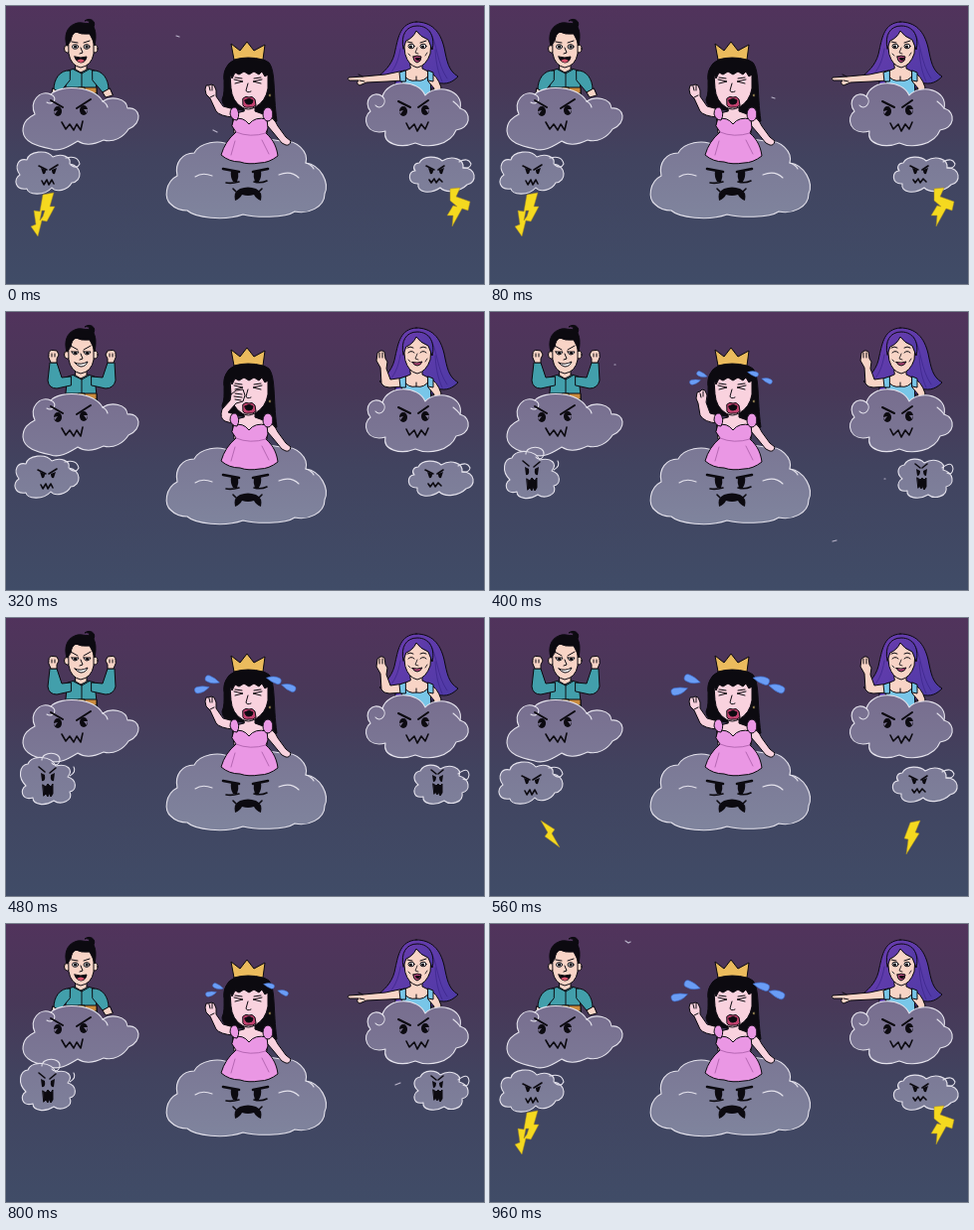
An HTML page for the animation above (1.04 s loop, 480x280 px).

```html
<!DOCTYPE html>
<html lang="en">
<head>
<meta charset="utf-8">
<title>Storm clouds</title>
<style>
html, body { margin: 0; width: 100%; height: 100%; overflow: hidden; background: #43405e; }
svg { display: block; width: 100%; height: 100%; }
.ink { stroke: #0c0a10; stroke-width: 1; stroke-linejoin: round; stroke-linecap: round; }
.line { fill: none; }
.skin { fill: #f8d4c6; }
.rosy { fill: #f9d2de; }
.teal { fill: #429fab; }
.blue { fill: #78c6e8; }
.pink { fill: #ea97e4; }
.black { fill: #0c0a10; }
.cloud { fill: url(#mist); stroke: #e4e2ec; stroke-width: 1.1; stroke-linejoin: round; stroke-linecap: round; }
.curl { fill: none; }
.face { fill: none; stroke: #0c0a10; stroke-width: 1.6; stroke-linejoin: round; stroke-linecap: round; }
.bolt { fill: #f5d91f; stroke: #a98c22; stroke-width: .5; }
.tear { fill: #6a9df5; stroke: #3f6fd0; stroke-width: .5; }
.speck { fill: none; stroke: #b9b3c9; stroke-width: 1.2; stroke-linecap: round; }
</style>
</head>
<body>
<svg viewBox="0 0 480 280" preserveAspectRatio="none">
<defs>
  <linearGradient id="sky" x2="0" y2="1">
    <stop offset="0" stop-color="#51335c"/>
    <stop offset=".28" stop-color="#483858"/>
    <stop offset=".55" stop-color="#41435f"/>
    <stop offset="1" stop-color="#404c67"/>
  </linearGradient>
  <linearGradient id="mist" gradientUnits="userSpaceOnUse" x1="0" y1="80" x2="0" y2="214">
    <stop offset="0" stop-color="#786e8f"/>
    <stop offset="1" stop-color="#7f849d"/>
  </linearGradient>
  <linearGradient id="hair" x2="1" y2="1">
    <stop offset="0" stop-color="#6c3cae"/>
    <stop offset="1" stop-color="#4c3aa6"/>
  </linearGradient>
</defs>
<rect width="480" height="280" fill="url(#sky)"/>
<g id="specks"></g>

<!-- prince -->
<g class="ink">
  <path class="teal" d="M62 65Q75 60 89 65L92 94H59Z"/>
  <path class="line" d="M76 65V83M68 64l8 4 7-4"/>
  <path fill="#c98a3c" d="M61 82H91V88H61Z"/>
  <rect x="73" y="82" width="6" height="6" fill="#e9bd58"/>
  <g data-pose="laugh">
    <path class="teal" d="M64 65C54 64 48 74 48 84L54 87 64 75Z"/>
    <path class="teal" d="M87 65C97 64 103 74 103 84L97 87 87 75Z"/>
    <path class="skin" d="M47 83l7 4-1 5-7-1zM104 83l-7 4 3 5 7-2z"/>
  </g>
  <g data-pose="smug">
    <path class="teal" d="M65 65L56 66 51 51 44 51 42 69Q43 77 51 77L65 74Z"/>
    <path class="teal" d="M86 65L97 66 102 51 109 51 110 69Q108 77 100 77L86 74Z"/>
    <path class="skin" d="M43 42Q43 38 47 38.500L51 39 53 43 51 47 51 51H45L43 46Z"/>
    <path class="skin" d="M110 42Q110 38 106 38.500L102 39 100 43 102 47 102 51H108L110 46Z"/>
    <path class="line" d="M46 42v3M49 42v3M104 42v3M107 42v3"/>
  </g>
  <path class="skin" d="M70 57H81V64L75 67 70 64Z"/>
  <ellipse class="skin" cx="61.500" cy="43" rx="3" ry="4"/>
  <ellipse class="skin" cx="89" cy="43" rx="3" ry="4"/>
  <path class="skin" d="M63 30Q75 21 88 30L88 48Q86 60 75 62 65 60 63 48Z"/>
  <path class="black" d="M61 40C58 30 61 21 69 18 75 15 80 19 84 17 84 15 81 14 79 15 84 11 91 15 88 21 91 27 90 34 89 40L87 34 84 28Q75 29 70 26 66 28 65 35Z"/>
  <path class="line" d="M75 42l2 5-3 1"/>
  <g data-pose="laugh">
    <path class="line" d="M66 36l6 1M78 37l6-2"/>
    <ellipse cx="69.500" cy="41" rx="3" ry="2.300" fill="#fff"/>
    <ellipse cx="81" cy="41" rx="3" ry="2.300" fill="#fff"/>
    <path class="black" d="M69 40h1.500v2H69zM80.500 40H82v2h-1.500z"/>
    <path class="black" d="M69 51Q75 53 81 51 80 57 75 57 70 56 69 51Z"/>
    <path fill="#d9546c" stroke="none" d="M71 55Q75 52 79 55 77 57 75 57 72 56 71 55Z"/>
  </g>
  <g data-pose="smug">
    <path class="line" d="M65 34l7 4M78 38l7-4"/>
    <path fill="#fff" d="M66 40H73Q72 43 69 43 67 43 66 40ZM78 40H85Q84 43 81 43 79 43 78 40Z"/>
    <path class="black" d="M69 40.500h1.500v1.500H69zM81 40.500h1.500v1.500H81z"/>
    <path fill="#fff" d="M69 51Q75 54 82 50 80 55 75 55 71 54 69 51Z"/>
  </g>
</g>

<!-- lady -->
<g class="ink">
  <path fill="url(#hair)" d="M412 16C396 17 394 31 391 44 389 57 382 64 375 70 382 73 388 73 392 71L390 82 430 83 433 77C443 80 449 76 454 71 444 65 443 56 440 42 436 25 427 16 412 16Z"/>
  <path fill="none" stroke="#3a2488" stroke-width=".7" d="M425 24C434 39 432 57 443 73M396 43C394 56 390 64 384 70M431 44C432 59 434 67 438 76"/>
  <path class="skin" d="M406 57H418V63L428 68 426 82H398L397 67 406 63Z"/>
  <path class="blue" d="M398 68Q404 77 412 75 420 77 426 68L427 92H398Z"/>
  <path class="line" d="M412 71v4"/>
  <g data-pose="laugh">
    <path class="skin" d="M400 65L381 69 359 71 344 72Q342 74 345 75L354 75Q351 78 355 80L362 77 383 76 400 75Z"/>
    <path class="line" d="M355 75l5 1M358 71l-4-2"/>
  </g>
  <g data-pose="smug">
    <path class="skin" d="M400 66L386 68 382 57 383 50 381 47 380 40 378 39 376 39 373 41 372 49 376 56 377 72Q379 76 385 76L400 75Z"/>
    <path class="line" d="M375 41v5M378 41v5"/>
  </g>
  <path class="blue" d="M401 65L395 67 396 76 401 76Z"/>
  <path class="skin" d="M424 66Q433 69 437 82L434 90 427 91 430 83 424 76Z"/>
  <path class="blue" d="M424 65L429 67 429 76 424 75Z"/>
  <path class="skin" d="M399 33Q403 24 413 25 424 25 427 34L426 48Q422 60 413 62 404 60 401 49Z"/>
  <path fill="url(#hair)" d="M399 43C396 29 402 20 413 20 426 20 431 32 428 44L424 34Q416 31 412 25 409 32 402 35Z"/>
  <path class="line" stroke-width=".8" d="M413 42l-2 5 3 1M404 48l2 2M423 47l-2 3"/>
  <g data-pose="laugh">
    <path class="line" d="M403 36l5 1M416 37l6-2"/>
    <ellipse cx="407" cy="40.500" rx="3" ry="2.300" fill="#fff"/>
    <ellipse cx="419" cy="40.500" rx="3" ry="2.300" fill="#fff"/>
    <path class="black" d="M406 40h1.500v1.500H406zM418 40h1.500v1.500H418z"/>
    <path fill="#b8477c" d="M409 51Q413 49 417 51 417 56 413 57 409 56 409 51Z"/>
    <path class="black" stroke="none" d="M411 52h5q0 3-2.500 3t-2.500-3z"/>
  </g>
  <g data-pose="smug">
    <path class="line" d="M403 36q3-2 6 0M416 36q3-2 6 0M404 41q3-3 6 0M416 41q3-3 6 0"/>
    <path fill="#b8477c" d="M408 50.500Q413 52 418 50 416 54 413 54 410 54 408 50.500Z"/>
  </g>
</g>

<!-- large clouds -->
<g class="cloud">
  <path d="M45 89C54 79 88 80 97 96C106 90 121 93 122 103C135 101 138 118 123 124C118 132 108 138 98 135C86 141 78 140 72 136C62 142 54 147 45 144C32 141 18 138 17 126C17 116 23 112 29 109C23 96 34 84 45 89Z"/>
  <path class="curl" d="M45 89C53 92 47 101 41 97M97 96Q101 98 102 102"/>
  <path d="M378 91C384 73 414 74 421 90C432 78 460 84 456 103C469 107 466 124 452 125C446 140 424 144 411 138C396 144 378 139 381 126C361 131 357 112 366 106C358 96 368 84 378 91Z"/>
  <path class="curl" d="M378 91C384 97 376 106 371 100M449 96Q453 99 456 103"/>
</g>
<g class="face">
  <path stroke-width="2" d="M45 95L57 102M71 103L85 94M394 96L406 102M414 102L424 95"/>
  <path d="M56 117l4 7 4-5 4 6 3-6 4 6 2-9M402 118l3 6 5-5 3 7 4-7 4 5 3-7"/>
  <g class="black" stroke="none">
    <ellipse cx="52" cy="106" rx="4" ry="5"/><ellipse cx="78" cy="105" rx="4" ry="5"/>
    <ellipse cx="399" cy="106" rx="4" ry="5"/><ellipse cx="421" cy="105" rx="4" ry="5"/>
  </g>
</g>
<path fill="#79718f" d="M48 106l4-1-3 4zM82 104l-4 0 3 4zM395 106l4-1-3 4zM425 104l-4 0 3 4z"/>

<!-- middle cloud -->
<g class="cloud">
  <path d="M166 200C158 194 160 177 172 171C169 158 177 148 189 148C194 138 214 133 226 141C240 133 266 134 276 136C292 134 304 147 301 158C316 160 325 178 320 189C320 203 303 210 290 207C280 214 250 213 238 210C218 217 190 213 182 206Q172 206 166 200Z"/>
  <path class="curl" d="M190 172Q197 167 207 171M274 170Q286 165 294 173M301 158Q307 160 309 164"/>
</g>
<g class="face">
  <path stroke-width="2.600" d="M218 164L234 167M248 167L263 164"/>
  <path stroke-width="1.600" d="M221 178Q227 179 234 177M249 177Q256 179 262 176M228 184L231 187M257 184L254 187"/>
</g>
<path class="black" d="M226 166H233Q234 172 232 177H228Q225 172 226 166ZM249 166H256Q257 172 254 177H250Q248 172 249 166Z"/>
<path class="black" d="M230 196Q228 187 235 184 243 181 251 184 258 187 256 196 251 194 249 190 243 192 237 190 235 194 230 196Z"/>

<!-- princess -->
<g class="ink">
  <path class="black" d="M224 58C232 50 255 50 264 57 271 66 268 87 272 116 268 119 263 114 260 110L228 103C222 104 217 100 217 94 222 84 215 69 224 58Z"/>
  <path class="rosy" d="M239 99H250V106L264 111 262 128H229L227 109 239 106Z"/>
  <path class="rosy" d="M263 111Q269 112 273 121L281 132 286 136Q285 141 281 140L277 138 268 127 262 120Z"/>
  <path class="pink" d="M229 114Q238 111 244 119 250 111 262 114L263 123 261 128C269 135 272 143 273 151Q264 158 255 158 243 160 235 157 224 157 216 150 220 136 231 127L227 121Z"/>
  <path class="line" stroke="#a85ba6" stroke-width=".8" d="M231 127Q245 133 261 128M230 136L226 150M257 135L264 149"/>
  <ellipse class="pink" cx="263" cy="109" rx="5" ry="7"/>
  <path class="rosy" d="M225 67Q227 58 244 58 261 58 263 67L263 83Q261 96 250 102 243 106 237 102 227 96 226 83Z"/>
  <path class="black" d="M219 74C217 60 229 51 243 52 259 50 268 62 267 77L263 69 260 71 257 66 254 69 249 66 244 69 239 66 234 69 230 67 227 73 225 69Z"/>
  <path fill="#ebbb5d" d="M229 54L226 38 235 45 242 36 249 45 260 39 258 54Q243 50 229 54Z"/>
  <path class="line" d="M229 74L238 76 230 78M257 74L248 76 256 78M230 72l7 1M249 73l7-1M243 78L241 85Q242 88 246 86"/>
  <path fill="#c2416f" d="M238 93Q241 90 244 92 247 90 250 94L251 100Q248 103 244 102 239 103 238 100Z"/>
  <path class="black" d="M240 95Q244 92 248 95 248 99 244 99 240 99 240 95Z"/>
  <circle cx="265" cy="90" r="1.400" fill="#f1d27d"/>
  <g data-arm="up">
    <path class="rosy" d="M229 104L218 101 211 91 211 85 209 80 206 79 204 80 201 80 200 84 201 89 205 93 211 106Q215 111 228 112Z"/>
    <path class="line" d="M204 81l1 4M207 80v5M205 92l4-2"/>
  </g>
  <g data-arm="near">
    <path class="rosy" d="M229 104L221 102 217 91 218 84 216 79 213 78 211 80 208 81 207 87 209 92 211 104Q215 111 228 112Z"/>
    <path class="line" d="M211 82l1 4M214 80v5"/>
  </g>
  <g data-arm="wipe">
    <path class="rosy" d="M230 103L223 101 231 92 238 90 240 84 238 78 231 79 226 83 225 89 217 98Q214 107 220 110L230 113Z"/>
    <path class="line" d="M230 82l7 1M229 85l8 1M230 88l6 1"/>
  </g>
  <path class="pink" d="M231 102Q225 101 225 109 227 115 232 115 236 108 231 102Z"/>
</g>

<!-- small clouds -->
<g data-small="calm">
  <g class="cloud">
    <path d="M21 155C23 146 41 144 47 152C56 148 66 152 64 159C77 161 77 177 66 178C62 186 50 188 46 183C38 192 22 190 21 184C9 186 7 174 14 170C8 162 12 153 21 155Z"/>
    <path class="curl" d="M60 153Q72 150 74 159 71 165 65 160"/>
  </g>
  <g class="face" stroke-width="1.500">
    <path d="M33 161l8 4M44 165l8-5M36 176l2 4 3-5 2 5 3-5 2 4"/>
    <path class="black" stroke="none" d="M35 163l5 2q0 5-3 4zM51 163l-5 2q0 5 3 4z"/>
  </g>
</g>
<g data-small="calm">
  <g class="cloud">
    <path d="M415 158C419 150 433 151 438 156C448 150 460 154 459 163C472 162 474 178 463 180C456 187 442 189 436 183C426 190 412 188 414 179C403 180 403 166 411 166C408 163 410 158 415 158Z"/>
    <path class="curl" d="M455 157Q464 152 467 159 466 164 459 163"/>
  </g>
  <g class="face" stroke-width="1.500">
    <path d="M422 161l8 4M434 165l6-4M425 175l2 3 3-4 2 4 3-4 3 3"/>
    <path class="black" stroke="none" d="M424 163l5 2q0 5-3 4zM440 163l-5 2q0 5 3 4z"/>
  </g>
</g>
<g data-small="roar">
  <g class="cloud">
    <path d="M22 147C26 137 46 139 50 149C62 146 68 153 62 160C72 163 71 174 64 175C68 184 55 189 48 184C39 190 27 188 27 181C16 184 13 173 20 169C11 160 14 148 22 147Z"/>
    <path class="curl" d="M36 143C36 134 55 134 54 143 53 149 48 149 46 146M64 159Q71 155 68 150"/>
    <path d="M416 154C420 146 432 147 436 152C446 146 458 151 455 159C466 162 467 174 458 176C460 186 446 189 440 184C430 190 418 187 419 180C408 182 408 171 414 168C407 162 410 155 416 154Z"/>
    <path class="curl" d="M454 157Q464 149 465 158 464 165 459 162"/>
  </g>
  <g class="face" stroke-width="1.500">
    <path d="M33 150l6 5M44 156l6-5M427 153l5 4M434 157l5-4"/>
    <path class="black" stroke-width="1" d="M37 168l3 2 2-3 3 3 2-3 0 10-2 3-2-4-1 4-2-3-2 2zM429 167l3 2 2-2 2 2 2-2 0 9-2 3-2-4-1 3-2-3-1 2z"/>
    <path class="black" stroke="none" d="M35 156l4 2q1 7-3 6zM49 156l-4 2q-1 7 3 6zM428 158l4 2q0 5-3 5zM439 158l-4 2q0 5 3 5z"/>
  </g>
</g>

<g id="bolts"></g>
<g id="tears"></g>
</svg>
<script>
const STEP = 80, COUNT = 13, CYCLE = 5;
const $ = id => document.getElementById(id);

// One entry per step of the loop
const arms = "up up near wipe wipe near up up up up up up up".split(" ");
const smalls = "hit hit calm calm calm roar roar calm calm calm roar roar hit".split(" ");
const boltKinds = ["hit", "hit", "fall", "tiny", "", "", "", "fall", "tiny", "", "", "", "hit"];
const isSmug = n => n > 3 && n < 10;

const zig = d => `<path class="bolt" d="${d}Z"/>`;
const bolts = {
  hit: zig("M37 190L48 188 44 202 49 202 41 217 36 216 32 232 25 222 30 220 28 206 34 207Z M36 206L34 216 37 212 39 206") +
       zig("M446 184L456 183 452 192 466 197 464 206 458 204 448 222 449 211 443 211 449 201 453 202 446 196"),
  fall: zig("M51 204L65 213 62 217 70 231 55 220 58 216") +
        zig("M422 206L432 204 427 216 431 217 418 238 420 223 416 222"),
  tiny: zig("M39 206L28 212 32 215 26 224 37 217 33 214") +
        zig("M452 198L459 207 457 209 460 217 453 209 456 207")
};

// Each tear flies from one point to another: x, y, end x, end y, tilt
const jets = [
  [213, 63, 200, 61, 200], [206, 70, 185, 76, 165],
  [264, 62, 275, 63, 15], [278, 69, 291, 72, 20]
];
function tears(n) {
  if (n < CYCLE) return "";
  const p = n % CYCLE / (CYCLE - 1), out = 1 - (1 - p) ** 2;
  const size = .8 + .4 * Math.sin(Math.PI * p);
  return jets.map(([x, y, ex, ey, tilt]) =>
    `<path class="tear" transform="translate(${x + (ex - x) * out} ${y + (ey - y) * p}) rotate(${tilt}) scale(${size})"
      d="M-7 0Q-1 -4 4 -3A3 3 0 0 1 4 3Q-1 3 -7 0Z"/>`).join("");
}

const specks = {
  0: "M171 30l3 1M208 125l4 2", 1: "M283 92l3 1", 3: "M303 57l3-1M308 55l2-2M307 59l1 0",
  5: "M344 231l4-1M125 53l1 0M396 168l1 0", 9: "M107 137l2 1M111 142l4 1M233 250v1M232 262l2 2M233 273v2",
  10: "M391 162l5-2", 12: "M136 17l3 2 2-1"
};

function show(attr, test) {
  document.querySelectorAll(`[data-${attr}]`).forEach(el => {
    el.style.display = test(el.dataset[attr]) ? "" : "none";
  });
}

function draw(n) {
  const mood = smalls[n];
  show("pose", v => (v === "smug") === isSmug(n));
  show("arm", v => v === arms[n]);
  show("small", v => (v === "roar") === (mood === "roar"));
  document.querySelectorAll('[data-small="calm"]').forEach(el =>
    el.setAttribute("transform", mood === "hit" ? "" : "translate(-1 -2)"));
  $("bolts").innerHTML = bolts[boltKinds[n]] || "";
  $("tears").innerHTML = tears(n);
  $("specks").innerHTML = specks[n] ? `<path class="speck" d="${specks[n]}"/>` : "";
}

let last = -1;
function tick() {
  const n = Math.floor(performance.now() / STEP) % COUNT;
  if (n !== last) draw(last = n);
  requestAnimationFrame(tick);
}
tick();
</script>
</body>
</html>
```
